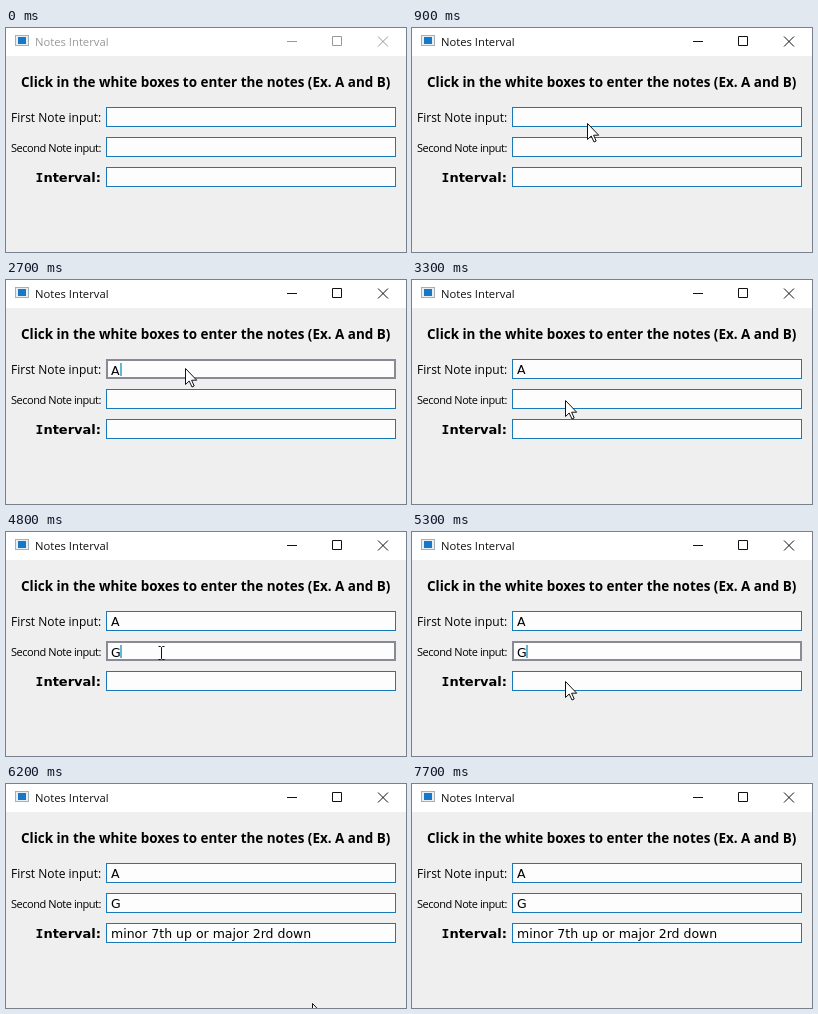
Animation of 400x224 px, one loop 9.5 s. Source, as an HTML page:

```html
<!DOCTYPE html>
<html lang="en">
<head>
<meta charset="utf-8">
<title>Notes Interval</title>
<style>
  html, body { margin: 0; width: 100%; height: 100%; overflow: hidden; background: #efefef; }
  svg { display: block; }
  text { font-family: "Open Sans", sans-serif; white-space: pre; }
  .title { font-size: 11.25px; }
  .head { font-size: 13.45px; font-weight: 700; }
  .label { font-size: 12px; }
  .tight { font-size: 11px; letter-spacing: -.45px; }
  .strong { font: 700 13px "DejaVu Sans", sans-serif; }
  .strong tspan { font-family: "DejaVu Sans Mono", monospace; }
  .field text { font: 12.5px "DejaVu Sans", sans-serif; }
  .field rect { fill: #fdfdfd; stroke: #1979b7; }
  .field.focus rect { stroke: #888b96; stroke-width: 2; }
  .caret { stroke: #2c9fc9; stroke-width: 1.5; }
</style>
</head>
<body>
<svg width="400" height="224" viewBox="0 0 400 224">
  <rect width="400" height="224" fill="#efefef"/>
  <rect width="400" height="28" fill="#fff"/>
  <rect x="9.5" y="7.5" width="13" height="10" fill="#e8eef2" stroke="#a3b1bb"/>
  <rect x="12" y="9" width="8" height="7" fill="#1878c8"/>
  <g id="bar">
    <text class="title" x="29" y="18" fill="currentColor">Notes Interval</text>
    <path d="M281 13.5H291M326.5 8.5h9v9h-9zM372 8.5l10 10M382 8.5l-10 10" fill="none" stroke="currentColor"/>
  </g>
  <text class="head" x="15" y="59">Click in the white boxes to enter the notes (Ex. A and B)</text>
  <text class="label" x="5" y="94">First Note input:</text>
  <text class="label tight" x="5" y="124">Second Note input:</text>
  <text class="strong" x="95" y="154" text-anchor="end"><tspan>I</tspan>nterval:</text>
  <g id="fields"></g>
  <g id="cursor">
    <path id="arrow" d="M.5 .5V16.5L4.2 13L7 19L9.2 18L6.6 12.2H11.7Z" fill="#fff" stroke="#111"/>
    <path id="beam" d="M-3 -6.5H-1L0 -5.5L1 -6.5H3M0 -5.5V5.5M-3 6.5H-1L0 5.5L1 6.5H3" fill="none" stroke="#111" transform="translate(.5 0)"/>
  </g>
</svg>
<script>
const LOOP = 9500, STEP = 100;
const $ = id => document.getElementById(id);

// Focus, caret and text times of each input row
const rows = [
  { y: 79, focus: [1400, 3300], caret: 2100, typed: 2500, text: "A" },
  { y: 109, focus: [3500, 5500], caret: 4100, typed: 4500, text: "G" },
  { y: 139, focus: [LOOP, LOOP], caret: LOOP, typed: 5500, text: "minor 7th up or major 2rd down" }
];

// Pointer path: time, x, y
const path = [
  [500, 182, 157], [1100, 172, 73], [1300, 172, 73], [1400, 172, 85],
  [2600, 172, 85], [2700, 179, 88], [3000, 157, 125], [3100, 153, 120],
  [3400, 153, 120], [3500, 155, 121], [4800, 155, 121], [5300, 153, 149],
  [5400, 151, 151], [5500, 147, 153], [5600, 147, 153], [6200, 306, 219],
  [7500, 306, 219], [7600, 307, 221], [7700, 308, 226]
];

$("fields").innerHTML = rows.map(r =>
  `<g class="field"><rect/><text x="105"></text>
   <path class="caret" d="M0 ${r.y + 4}v13"/></g>`).join("");
rows.forEach((r, i) => {
  r.group = $("fields").children[i];
  [r.rect, r.label, r.bar] = r.group.children;
});

const show = (el, on) => el.setAttribute("visibility", on ? "visible" : "hidden");
const within = (t, a, b) => t >= a && t < b;

function pointerAt(t) {
  const i = path.findIndex(p => p[0] > t);
  if (i < 1) return path[i < 0 ? path.length - 1 : 0].slice(1);
  const [t0, x0, y0] = path[i - 1], [t1, x1, y1] = path[i];
  const k = (t - t0) / (t1 - t0), e = k * k * (3 - 2 * k);
  return [x0 + (x1 - x0) * e, y0 + (y1 - y0) * e].map(Math.round);
}

function drawRow(r, t) {
  const focus = within(t, ...r.focus), typed = t >= r.typed;
  const inset = focus ? 1 : .5;
  const box = { x: 100 + inset, y: r.y + inset, width: 290 - 2 * inset, height: 20 - 2 * inset };
  for (const k in box) r.rect.setAttribute(k, box[k]);
  r.group.classList.toggle("focus", focus);
  r.label.textContent = typed ? r.text : "";
  r.label.setAttribute("y", r.y + (focus ? 16 : 15));
  r.bar.setAttribute("transform", `translate(${typed ? 115 : 105.5} 0)`);
  show(r.bar, focus && t >= r.caret);
}

function frame(now) {
  const t = Math.floor(now % LOOP / STEP) * STEP;
  $("bar").style.color = t < 500 ? "#999" : "#111";
  rows.forEach(r => drawRow(r, t));
  const visible = within(t, 500, 7700), beam = within(t, 3500, 5000);
  $("cursor").setAttribute("transform", `translate(${pointerAt(t)})`);
  show($("arrow"), visible && !beam);
  show($("beam"), visible && beam);
}

const start = performance.now();
function tick() {
  frame(performance.now() - start);
  requestAnimationFrame(tick);
}
tick();
</script>
</body>
</html>
```
